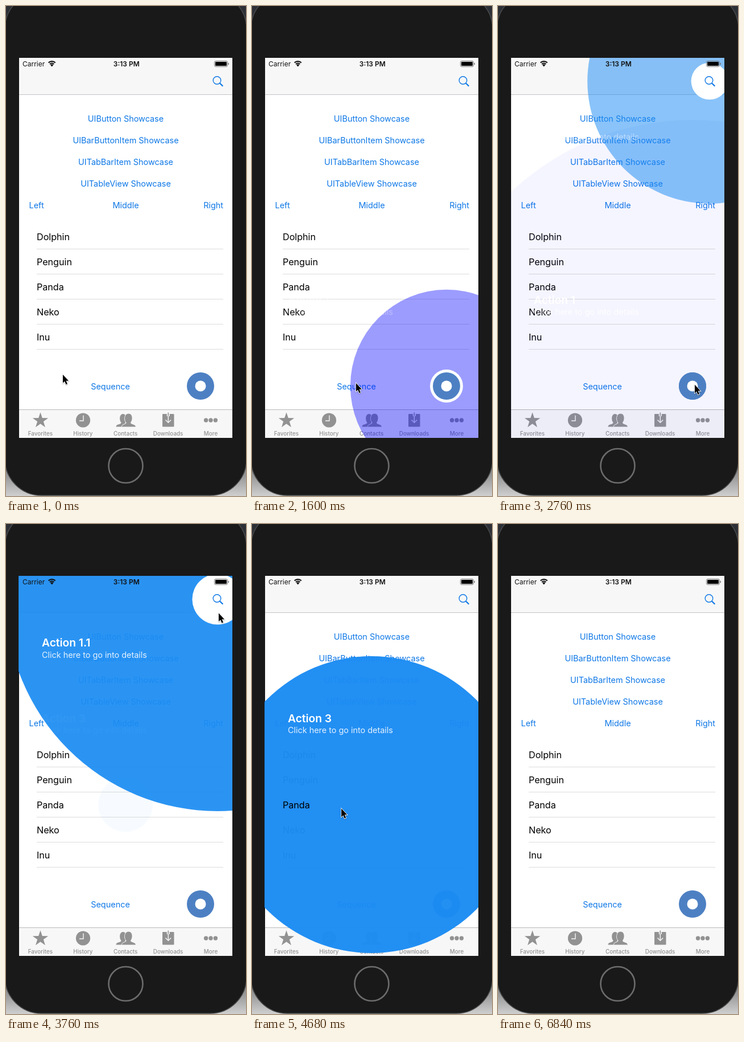
Recreate the animation shown at these times as an HTML page with a canvas. Size 422x860 px, loop 6880 ms.

```html
<!DOCTYPE html>
<html lang="en">
<head>
<meta charset="utf-8">
<title>Feature showcase</title>
<style>
html, body { margin: 0; width: 100%; height: 100%; overflow: hidden; background: #191919; }
canvas { display: block; }
</style>
</head>
<body>
<canvas id="stage" width="422" height="860"></canvas>
<script>
const c = document.getElementById('stage').getContext('2d');
const LOOP = 6880, TAU = Math.PI * 2;
const LINK = '#0f78e6', GRAY = '#929292', BAR = '#f7f7f7';

const clamp = x => Math.max(0, Math.min(1, x));
const ease = x => (1 - Math.cos(Math.PI * clamp(x))) / 2;
const mix = (a, b, p) => a + (b - a) * p;

function text(str, x, y, size, color, align = 'left', weight = 400) {
  c.font = `${weight} ${size}px Inter, "Noto Sans", sans-serif`;
  c.letterSpacing = size > 13 ? `${-size * 0.003}px` : '0px';
  c.textAlign = align;
  c.fillStyle = color;
  c.fillText(str, x, y);
}

function disc(x, y, r, color) {
  c.fillStyle = color;
  c.beginPath();
  c.arc(x, y, r, 0, TAU);
  c.fill();
}

function rect(x, y, w, h, color, r = 0) {
  c.fillStyle = color;
  c.beginPath();
  c.roundRect(x, y, w, h, r);
  c.fill();
}

function line(points, width, color) {
  c.strokeStyle = color;
  c.lineWidth = width;
  c.beginPath();
  points.forEach(p => c.lineTo(...p));
  c.stroke();
}

function shape(path, color) {
  c.fillStyle = color;
  c.fill(new Path2D(path));
}

// Parts that are drawn again above a showcase
function actionButton() {
  disc(342, 667, 24, '#4d80c3');
  disc(342, 667, 9.5, '#fff');
}

function searchIcon() {
  c.strokeStyle = LINK;
  c.lineWidth = 1.4;
  c.beginPath();
  c.arc(371, 130.5, 6.8, 0, TAU);
  c.stroke();
  line([[376, 135.5], [381.3, 140.8]], 2.2, LINK);
}

const row = (str, i) => text(str, 54, 410.7 + 44 * i, 16.2, '#000');

function phone() {
  const back = c.createLinearGradient(0, 0, 0, 860);
  back.addColorStop(0, '#2c3036');
  back.addColorStop(0.9, '#4a4a4a');
  back.addColorStop(0.96, '#989898');
  back.addColorStop(1, '#cfcfcf');
  c.fillStyle = back;
  c.fillRect(0, 0, 422, 860);
  rect(-2, -24, 425, 883, '#191919', 64);
  c.strokeStyle = '#48494a';
  c.lineWidth = 1.5;
  c.stroke();
  c.strokeStyle = '#6c6c6c';
  c.lineWidth = 2.6;
  c.beginPath();
  c.arc(210.5, 807, 30, 0, TAU);
  c.stroke();
}

function tabs() {
  rect(23, 708, 375, 50, BAR);
  rect(23, 708, 375, 1, '#b9b9bb');
  ['Favorites', 'History', 'Contacts', 'Downloads', 'More'].forEach((name, i) =>
    text(name, 60.4 + 74.9 * i, 753.5, 9.9, GRAY, 'center', 500));

  c.fillStyle = GRAY;
  c.beginPath();
  for (let i = 0; i < 10; i++) {
    const r = i % 2 ? 5.6 : 14.4, a = i * Math.PI / 5;
    c.lineTo(60.5 + r * Math.sin(a), 727.6 - r * Math.cos(a));
  }
  c.fill();

  disc(135.5, 727, 12.6, GRAY);
  line([[136, 718.5], [136, 728], [129, 728]], 1.4, BAR);

  shape('M193.5 738.5C193.5 733 203 735 202.5 731C199 727 199 716 206 716C212 716 213 726 209.5 731L211 738.5Z', GRAY);
  const front = 'M203.5 738.5C204 734 211.5 734.5 211.5 731C207.5 727 208 715.5 215.5 715.5C223 715.5 223 727 219 731C219 735 227.5 733.5 228 738.5Z';
  c.strokeStyle = BAR;
  c.lineWidth = 1.6;
  c.stroke(new Path2D(front));
  shape(front, GRAY);

  rect(275, 716, 20.5, 22.5, GRAY, 1);
  rect(282.8, 715, 5, 5, BAR);
  line([[285.3, 713.5], [285.3, 721]], 1.6, GRAY);
  line([[285.3, 719.5], [285.3, 731]], 1.5, BAR);
  line([[280.5, 726.5], [285.3, 731.3], [290.1, 726.5]], 1.5, BAR);

  for (const x of [351.6, 360, 368.4]) disc(x, 727, 3.7, GRAY);
}

function page() {
  rect(23, 91, 375, 667, '#fff');
  rect(23, 91, 375, 64, BAR);
  rect(23, 155, 375, 1, '#c4c4c6');
  searchIcon();
  ['UIButton', 'UIBarButtonItem', 'UITabBarItem', 'UITableView'].forEach((name, i) =>
    text(name + ' Showcase', 210.5, 202.7 + 38 * i, 14.5, LINK, 'center'));
  text('Left', 40.5, 354.7, 14.5, LINK);
  text('Middle', 210.5, 354.7, 14.5, LINK, 'center');
  text('Right', 382, 354.7, 14.5, LINK, 'right');
  ['Dolphin', 'Penguin', 'Panda', 'Neko', 'Inu'].forEach((name, i) => {
    row(name, i);
    rect(54, 426 + 44 * i, 328, 1, '#dcdcde');
  });
  text('Sequence', 183.5, 673, 14.5, LINK, 'center');
  actionButton();
  tabs();
}

function statusBar() {
  text('Carrier', 29, 105.5, 12, '#111');
  text('3:13 PM', 211.8, 105.5, 12, '#111', 'center', 600);
  c.strokeStyle = '#111';
  c.lineWidth = 2.1;
  for (const r of [5.4, 8.9]) {
    c.beginPath();
    c.arc(80.7, 106, r, -2.32, -0.82);
    c.stroke();
  }
  shape('M80.7 106.5L78 103.3Q80.7 101.2 83.4 103.3Z', '#111');
  c.strokeStyle = '#777';
  c.lineWidth = 1;
  c.beginPath();
  c.roundRect(366.5, 96.5, 23, 10, 2.5);
  c.stroke();
  rect(368, 98, 20, 7, '#000', 1);
  rect(390.6, 99.7, 1.4, 3.6, '#777', 0.7);
}

const BLUE = '#1b8cf3';
const showcases = [
  { x: 342, y: 667, r: 362.7, color: '#0000ff', title: 'Action 1', base: 522.6, start: 1383, end: 2500, holder: true, target: actionButton },
  { x: 372, y: 132, r: 367, color: BLUE, title: 'Action 1.1', base: 215.4, start: 2500, end: 3720, holder: true, target: searchIcon },
  { x: 210, y: 492.5, r: 260.5, color: BLUE, title: 'Action 3', base: 348, start: 3700, end: 4850, holder: false, target: () => row('Panda', 2) }
];

function showcase(s, t) {
  if (t < s.start || t > s.end + 500) return;
  const come = ease((t - s.start) / 500);
  const go = ease((t - s.end) / 300);
  const fade = 1 - ease((t - s.end - 300) / 200);

  c.globalAlpha = 0.97 * come * (1 - go);
  disc(s.x, s.y, mix(40, s.r, come) * (1 + 0.3 * go), s.color);

  c.globalAlpha = come * fade;
  text(s.title, 63, s.base, 19.3, '#fff', 'left', 600);
  text('Click here to go into details', 63, s.base + 19.4, 14.5, 'rgba(255,255,255,.87)');

  if (s.holder) {
    const beat = Math.max(0, Math.min(t, s.end) - s.start - 500) % 1000 / 500;
    const swell = mix(1, 1.07, ease(beat < 1 ? beat : 2 - beat));
    if (beat > 1 && t < s.end) {
      const p = ease(beat - 1);
      c.globalAlpha = 0.5 * (1 - p);
      disc(s.x, s.y, 44 * mix(1.07, 1.6, p), '#fff');
    }
    c.globalAlpha = fade;
    disc(s.x, s.y, mix(19, 44, come) * mix(swell, 0.4, go), '#fff');
  }
  c.globalAlpha = s.holder ? fade : come * fade;
  s.target();
  c.globalAlpha = 1;
}

// Pointer stops: time, x, y
const stops = [
  [0, 100, 647], [650, 106, 650], [1200, 183, 662], [1620, 183, 662], [2200, 346, 663],
  [2900, 346, 665], [3500, 374, 156.5], [4000, 374, 156.5], [4560, 157, 499.5],
  [5150, 159, 500], [5850, 159, 500], [6350, 400, 600]
];

function pointer(t) {
  const i = stops.findIndex(s => s[0] > t);
  if (i < 1) return;
  const [a, b] = [stops[i - 1], stops[i]];
  const p = ease((t - a[0]) / (b[0] - a[0]));
  c.save();
  c.translate(mix(a[1], b[1], p), mix(a[2], b[2], p));
  const arrow = new Path2D('M0 0V14.6L3.2 11.7L5.6 17.3L8 16.2L5.6 10.8H10Z');
  c.shadowColor = 'rgba(0,0,0,.3)';
  c.shadowBlur = 2;
  c.shadowOffsetY = 1;
  c.strokeStyle = '#fff';
  c.lineWidth = 1.6;
  c.stroke(arrow);
  c.shadowColor = 'transparent';
  c.fillStyle = '#000';
  c.fill(arrow);
  c.restore();
}

function draw(now) {
  const t = now % LOOP;
  phone();
  c.save();
  c.beginPath();
  c.rect(22, 91, 376, 667);
  c.clip();
  page();
  showcases.forEach(s => showcase(s, t));
  statusBar();
  c.restore();
  pointer(t);
}

const begin = performance.now();
function tick() {
  draw(performance.now() - begin);
  requestAnimationFrame(tick);
}
tick();
</script>
</body>
</html>
```
